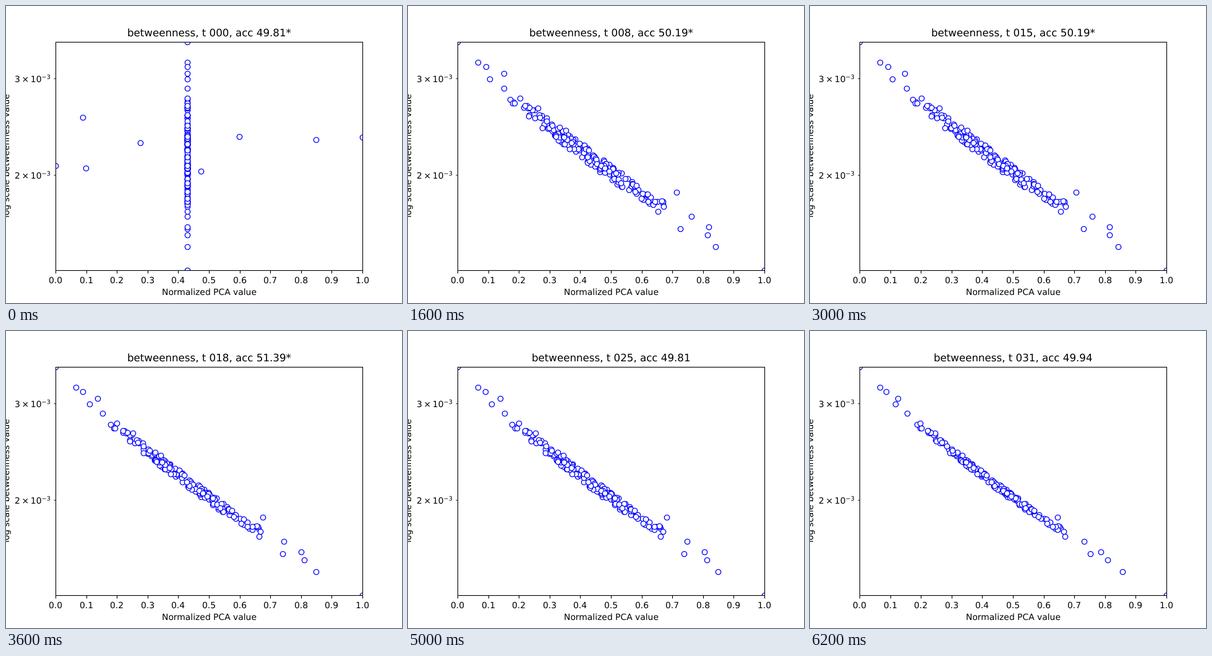
These frames come from a looping animation (640 px wide and 480 px high, 6400 ms). An HTML page with a canvas:

```html
<!DOCTYPE html>
<html lang="en">
<head>
<meta charset="utf-8">
<title>Betweenness scatter</title>
<style>
  html, body { margin: 0; width: 100%; height: 100%; overflow: hidden; background: #fff; }
  canvas { display: block; }
</style>
</head>
<body>
<canvas id="plot" width="640" height="480"></canvas>
<script>
const ctx = document.getElementById("plot").getContext("2d");
const STEP = 200, STEPS = 32;
const LEFT = 80, RIGHT = 576, TOP = 58, BOTTOM = 427;
const COLUMN = 293, BEND = 0.0016;

// Width of the cloud around its trend, as [step, spread]
const spreadKeys = [[1, 1.2], [8, 1.28], [12, 1.5], [18, 0.87], [27, 0.95], [31, 0.56]];
// Accuracy shown from a step on
const accuracy = [[0, "49.81*"], [5, "50.19*"], [17, "51.39*"], [20, "49.81"], [30, "49.94"]];

// Lone points at the ends of the cloud, x and y at spread 1
const lone = [
  [80, 58], [113, 91], [125, 98], [150, 109], [134, 118], [156, 133], [421, 301],
  [452, 340], [445, 360], [480, 357], [483, 370], [500, 389], [576, 427]
];
// Points beside the column at the first step, x and y
const strays = [[80, 258], [124, 180], [129, 262], [217, 221], [315, 267], [377, 211], [501, 216], [576, 212]];

let seed = 7;
function random() {
  seed = (seed * 16807) % 2147483647;
  return seed / 2147483647;
}

function trend(y) {
  return LEFT + (RIGHT - LEFT) * Math.expm1(BEND * (y - TOP)) / Math.expm1(BEND * (BOTTOM - TOP));
}

const points = lone.map(([x, y]) => ({ y, start: COLUMN, offset: x - trend(y) }));
for (let i = 0; i < 175; i++) {
  const y = 136 + 206 * (0.65 * random() + 0.35 * random());
  points.push({ y, start: COLUMN, offset: 13 * (2 * random() - 1) });
}
for (const [start, y] of strays) points.push({ y, start, offset: 0 });

function spreadAt(step) {
  const i = Math.max(1, spreadKeys.findIndex(k => k[0] >= step));
  const [a, from] = spreadKeys[i - 1], [b, to] = spreadKeys[i];
  return from + (to - from) * (step - a) / (b - a);
}

function text(str, x, y, size = 13.89) {
  ctx.font = size + "px 'DejaVu Sans', sans-serif";
  ctx.textRendering = "geometricPrecision";
  ctx.fillText(str, x, y);
  return ctx.measureText(str).width;
}

function centered(str, x, y, size = 13.89) {
  ctx.font = size + "px 'DejaVu Sans', sans-serif";
  ctx.textRendering = "geometricPrecision";
  text(str, Math.round(x - ctx.measureText(str).width / 2), y, size);
}

function line(x1, y1, x2, y2, width) {
  ctx.lineWidth = width;
  ctx.beginPath();
  ctx.moveTo(x1, y1);
  ctx.lineTo(x2, y2);
  ctx.stroke();
}

function drawPoints(step) {
  const spread = spreadAt(step);
  ctx.save();
  ctx.beginPath();
  ctx.rect(LEFT, TOP, RIGHT - LEFT, BOTTOM - TOP);
  ctx.clip();
  ctx.fillStyle = "#fff";
  ctx.strokeStyle = "#00f";
  ctx.lineWidth = 1.39;
  for (const p of points) {
    const x = step ? trend(p.y) + p.offset * spread : p.start;
    ctx.beginPath();
    ctx.arc(Math.round(x) + 0.5, Math.round(p.y) + 0.5, 4.17, 0, 2 * Math.PI);
    ctx.fill();
    ctx.stroke();
  }
  ctx.restore();
}

function drawAxes() {
  ctx.fillStyle = ctx.strokeStyle = "#000";
  for (let i = 0; i <= 10; i++) {
    const x = LEFT + 49.6 * i;
    line(Math.round(x) + 0.5, 428, Math.round(x) + 0.5, 432.4, 1.11);
    centered((i / 10).toFixed(1), x, 448);
  }
  for (const [digit, y] of [["3", 117], ["2", 273]]) {
    line(77.5, y + 0.5, LEFT, y + 0.5, 0.83);
    let x = 14;
    x += text(digit, x, y + 6) + 2.7;
    x += text("×", x, y + 6) + 2.7;
    x += text("10", x, y + 6);
    text("−3", x, y + 1, 9.72);
  }
  ctx.lineWidth = 1.11;
  ctx.strokeRect(LEFT + 0.5, TOP + 0.5, RIGHT - LEFT, BOTTOM - TOP);
  centered("Normalized PCA value", 328, 467);
  ctx.save();
  ctx.translate(5, 242);
  ctx.rotate(-Math.PI / 2);
  centered("log scale betweenness value", 0, 0);
  ctx.restore();
}

function draw(now) {
  const step = Math.floor(now / STEP) % STEPS;
  const acc = accuracy.filter(a => a[0] <= step).pop()[1];
  ctx.fillStyle = "#fff";
  ctx.fillRect(0, 0, 640, 480);
  drawPoints(step);
  drawAxes();
  centered(`betweenness, t ${String(step).padStart(3, "0")}, acc ${acc}`, 328, 49, 16.67);
}

const begin = performance.now();
function tick() {
  draw(performance.now() - begin);
  requestAnimationFrame(tick);
}
tick();
</script>
</body>
</html>
```
